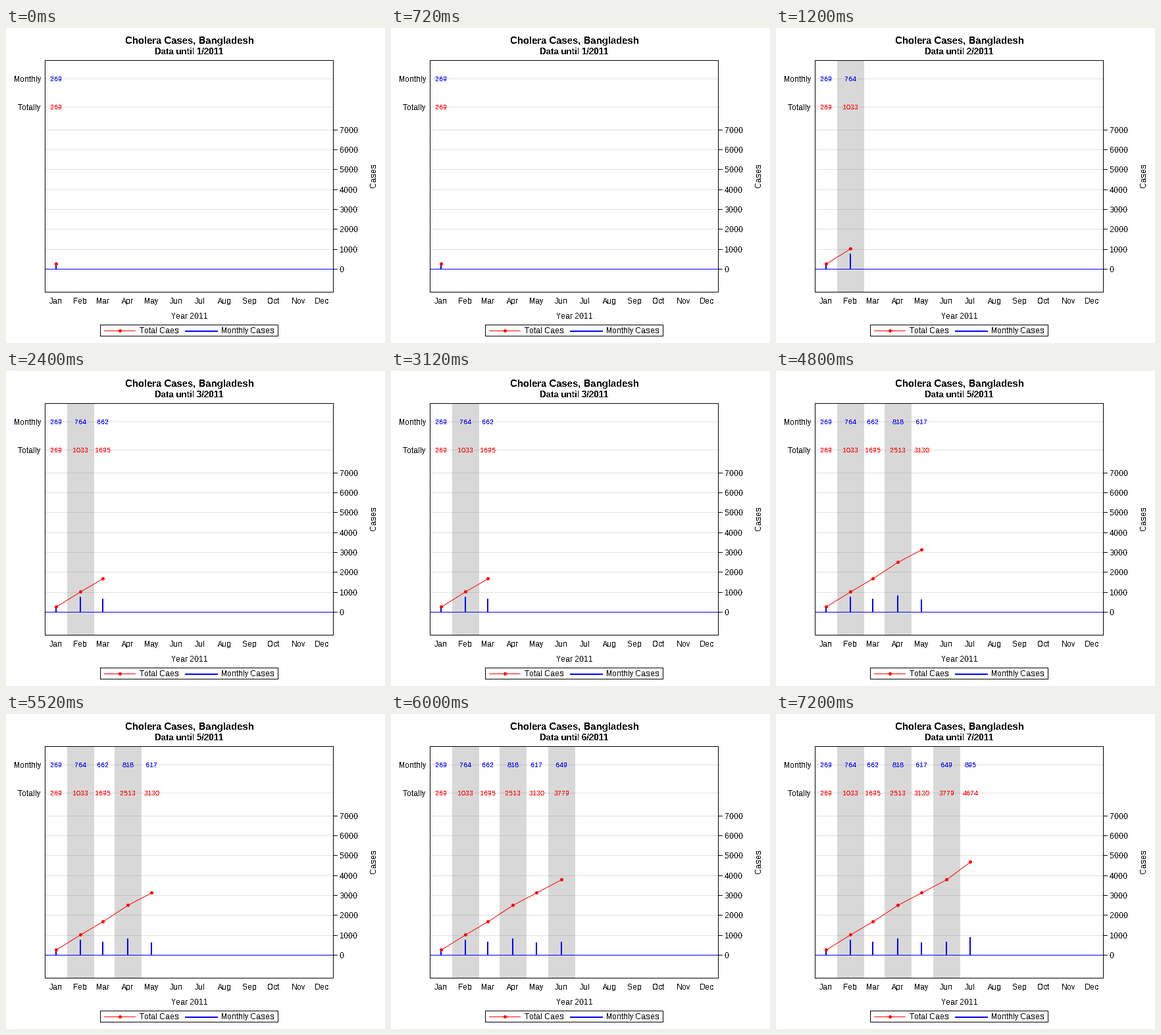
A matplotlib script that plays this animation: 576x480 px, repeating every 8 s.

```python
import math

import matplotlib as mpl
import matplotlib.pyplot as plt
from matplotlib.animation import FuncAnimation
from matplotlib.patches import Circle, Rectangle
from matplotlib.text import Text

W, H, DPI = 576, 480, 96
LEFT, RIGHT, TOP, BOTTOM = 59, 497, 49, 402
ZERO_Y, PX_PER_CASE = 367, 212.4 / 7000
ROW_MONTHLY, ROW_TOTAL = 77, 120
HINTED, SMOOTH = 1, 8

MONTHS = "Jan Feb Mar Apr May Jun Jul Aug Sep Oct Nov Dec".split()
DAYS = [31, 28, 31, 30, 31, 30, 31, 31, 30, 31, 30, 31]
CASES = [269, 764, 662, 818, 617, 649, 895]
TOTALS = [sum(CASES[:i + 1]) for i in range(len(CASES))]

FRAMES, INTERVAL = 20, 400
FRAMES_PER_MONTH = 3

plt.rcParams.update({
    "font.family": "Liberation Sans",
    "text.hinting": "default",
    "text.hinting_factor": HINTED,
    "text.kerning_factor": 6,
    "text.antialiased": False,
})

fig = plt.figure(figsize=(W / DPI, H / DPI), dpi=DPI, facecolor="white")
ax = fig.add_axes([0, 0, 1, 1])
ax.set_xlim(0, W)
ax.set_ylim(H, 0)
ax.axis("off")


class Heading(Text):
    """Bold text with unrounded letter spacing."""

    def draw(self, renderer):
        with mpl.rc_context({"text.hinting_factor": SMOOTH}):
            super().draw(renderer)


def month_x(i):
    """Pixel column of the first day of month i."""
    return round(76 + sum(DAYS[:i]) * 404 / 334)


def case_y(n):
    return math.floor(ZERO_Y - n * PX_PER_CASE + 0.5)


def box(x, y, w, h, color, z=2, alpha=None):
    return ax.add_patch(Rectangle((x, y), w, h, fc=color, lw=0,
                                  alpha=alpha, zorder=z))


def frame(x0, y0, x1, y1):
    """Black one-pixel outline through the given pixel rows and columns."""
    for y in (y0, y1):
        box(x0, y, x1 - x0 + 1, 1, "black", 5)
    for x in (x0, x1):
        box(x, y0, 1, y1 - y0 + 1, "black", 5)


def dot(x, y):
    return ax.add_patch(Circle((x + 0.5, y + 0.5), 2.5, fc="red", lw=0,
                               zorder=7))


def label(x, y, s, px=12, color="black", ha="center", **kw):
    return ax.text(x, y, s, fontsize=px * 0.75, color=color, ha=ha,
                   va="baseline", zorder=8, **kw)


def heading(y, s, px):
    text = Heading(278.5, y, s, fontsize=px * 0.75, weight="bold",
                   ha="center", va="baseline", zorder=8)
    return ax.add_artist(text)


def draw_axes():
    ticks = range(0, 8000, 1000)
    for y in [ROW_MONTHLY, ROW_TOTAL] + [case_y(n) for n in ticks]:
        box(LEFT + 1, y, RIGHT - LEFT + 1, 1, "#e0e0e0", 1)
    for n in ticks:
        box(RIGHT + 1, case_y(n), 6, 1, "black")
        label(507, case_y(n) + 5, str(n), ha="left")
    box(LEFT, ZERO_Y, RIGHT - LEFT, 1, "blue", 3)
    frame(LEFT, TOP, RIGHT, BOTTOM)

    label(53, ROW_MONTHLY + 5, "Monthly", ha="right")
    label(53, ROW_TOTAL + 5, "Totally", ha="right")
    for i, name in enumerate(MONTHS):
        label(month_x(i), 420, name)
    label(279, 443, "Year 2011")
    label(562, 224.5, "Cases", rotation=90, rotation_mode="anchor")


def draw_legend():
    frame(143, 452, 413, 469)
    box(149, 461, 48, 1, "red")
    dot(173, 461)
    label(203, 465, "Total Caes", ha="left")
    box(272, 461, 50, 2, "blue")
    label(327, 465, "Monthly Cases", ha="left")


def month_parts(i):
    """All artists that appear together with month i."""
    x, y = month_x(i), case_y(CASES[i])
    parts = [
        box(x - 1, y, 2, ZERO_Y + 1 - y, "blue", 4),
        dot(x, case_y(TOTALS[i])),
        label(x + 0.5, ROW_MONTHLY + 4, str(CASES[i]), 10, "blue"),
        label(x + 0.5, ROW_TOTAL + 4, str(TOTALS[i]), 10, "red"),
    ]
    if i % 2:
        parts.append(box(x - 20, TOP + 1, 41, BOTTOM - TOP - 1,
                         "#808080", 1.5, alpha=0.3))
    return parts


draw_axes()
draw_legend()
heading(24, "Cholera Cases, Bangladesh", 14.9)
subtitle = heading(40, "", 13.2)
months = [month_parts(i) for i in range(len(CASES))]
line_x = [month_x(i) + 0.5 for i in range(len(CASES))]
line_y = [case_y(n) + 0.5 for n in TOTALS]
curve, = ax.plot([], [], color="red", lw=0.75, zorder=6)


def update(k):
    last = k // FRAMES_PER_MONTH
    subtitle.set_text(f"Data until {last + 1}/2011")
    curve.set_data(line_x[:last + 1], line_y[:last + 1])
    for i, parts in enumerate(months):
        for part in parts:
            part.set_visible(i <= last)


anim = FuncAnimation(fig, update, frames=FRAMES, interval=INTERVAL,
                     init_func=lambda: update(0), repeat=True,
                     repeat_delay=0, blit=False)
plt.show()
```
